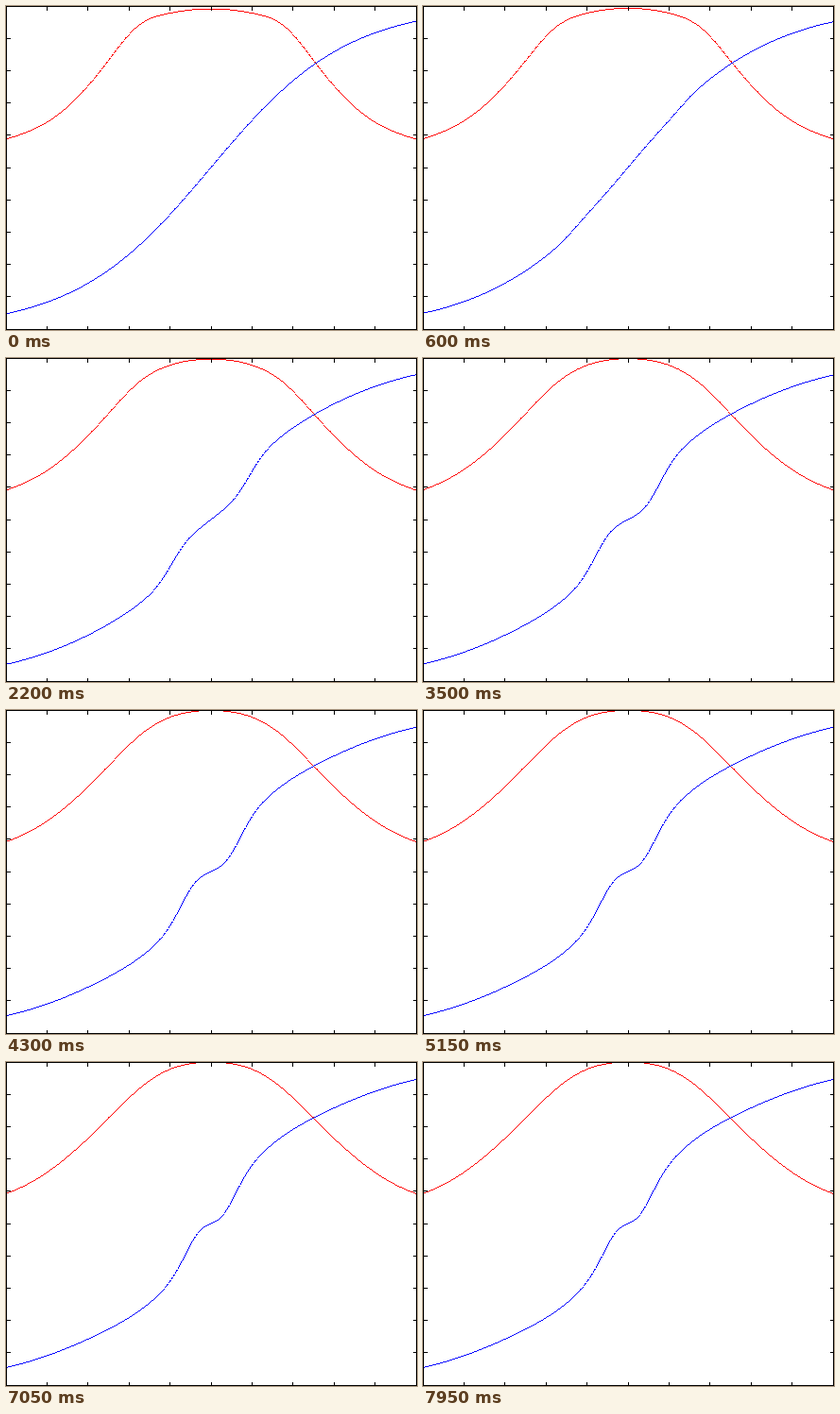
Recreate the animation shown at these times as an HTML page with a canvas. Size 435 px wide and 343 px high, loop 8 s.

```html
<!DOCTYPE html>
<html lang="en">
<head>
<meta charset="utf-8">
<title>Curves</title>
<style>
  html, body { margin: 0; width: 100%; height: 100%; overflow: hidden; background: #fff; }
  canvas { display: block; width: 435px; height: 343px; image-rendering: pixelated; }
</style>
</head>
<body>
<canvas id="plot" width="435" height="343"></canvas>
<script>
const W = 435, H = 343;
const CX = 216.5, CY = 170.5, HALF_W = 217, HALF_H = 171;
const LOOP = 8000, STEP = 50;
const ctx = document.getElementById('plot').getContext('2d');

const bump = (x, width, power = 2) => Math.exp(-((Math.abs(x) / width) ** power));
const decay = (s, tau) => Math.exp(-s / tau);

// A tanh whose slope swells around the centre while a narrowing dip flattens the middle.
function blue(s) {
  const swell = 0.45 * (1 - decay(s, 2.2));
  const dip = 1.02 * (1 - bump(s, 2.4, 1.7));
  const width = 0.1 + 0.22 * decay(s, 2.4);
  const power = 2 + 4 * decay(s, 1.7);
  return x => {
    const slope = 1 - 0.11 * swell + swell * bump(x, 0.4) - dip * bump(x, width, power);
    return Math.tanh(1.5 * x * slope);
  };
}

// A flat-topped bell; its initially steeper shoulders relax over time.
function red(s) {
  const excess = decay(s, 2.4);
  return x => {
    const d = Math.abs(x);
    const rest = d * d * (1.81 - 0.95 * bump(d, 0.33) - 0.13 * d ** 8);
    const shoulder = 0.018 + 0.11 * bump(d - 0.8, 0.19) - 0.08 * bump(d - 0.38, 0.15);
    return Math.exp(-rest - excess * shoulder);
  };
}

// One crisp pixel per column, or a vertical run where the curve is steep.
function drawCurve(f, color) {
  const row = x => Math.round(CY - HALF_H * f((x - CX) / HALF_W));
  ctx.fillStyle = color;
  for (let x = 0; x < W; x++) {
    const a = row(x - 0.5), b = row(x + 0.5), span = Math.abs(b - a);
    if (span > 1) ctx.fillRect(x, Math.min(a, b), 1, span);
    else ctx.fillRect(x, row(x), 1, 1);
  }
}

function drawAxes() {
  ctx.fillStyle = '#000';
  ctx.fillRect(0, 0, W, 1);
  ctx.fillRect(0, H - 1, W, 1);
  ctx.fillRect(0, 0, 1, H);
  ctx.fillRect(W - 1, 0, 1, H);
  for (let i = 1; i < 10; i++) {
    const x = Math.floor(i * (W - 1) / 10), y = Math.floor(i * (H - 1) / 10);
    ctx.fillRect(x, 0, 1, 5);
    ctx.fillRect(x, H - 4, 1, 4);
    ctx.fillRect(0, y, 5, 1);
    ctx.fillRect(W - 4, y, 4, 1);
  }
}

const start = performance.now();
function tick() {
  const elapsed = (performance.now() - start) % LOOP;
  const seconds = Math.floor(elapsed / STEP) * STEP / 1000;
  ctx.fillStyle = '#fff';
  ctx.fillRect(0, 0, W, H);
  drawCurve(red(seconds), '#f00');
  drawCurve(blue(seconds), '#00f');
  drawAxes();
  requestAnimationFrame(tick);
}
tick();
</script>
</body>
</html>
```
